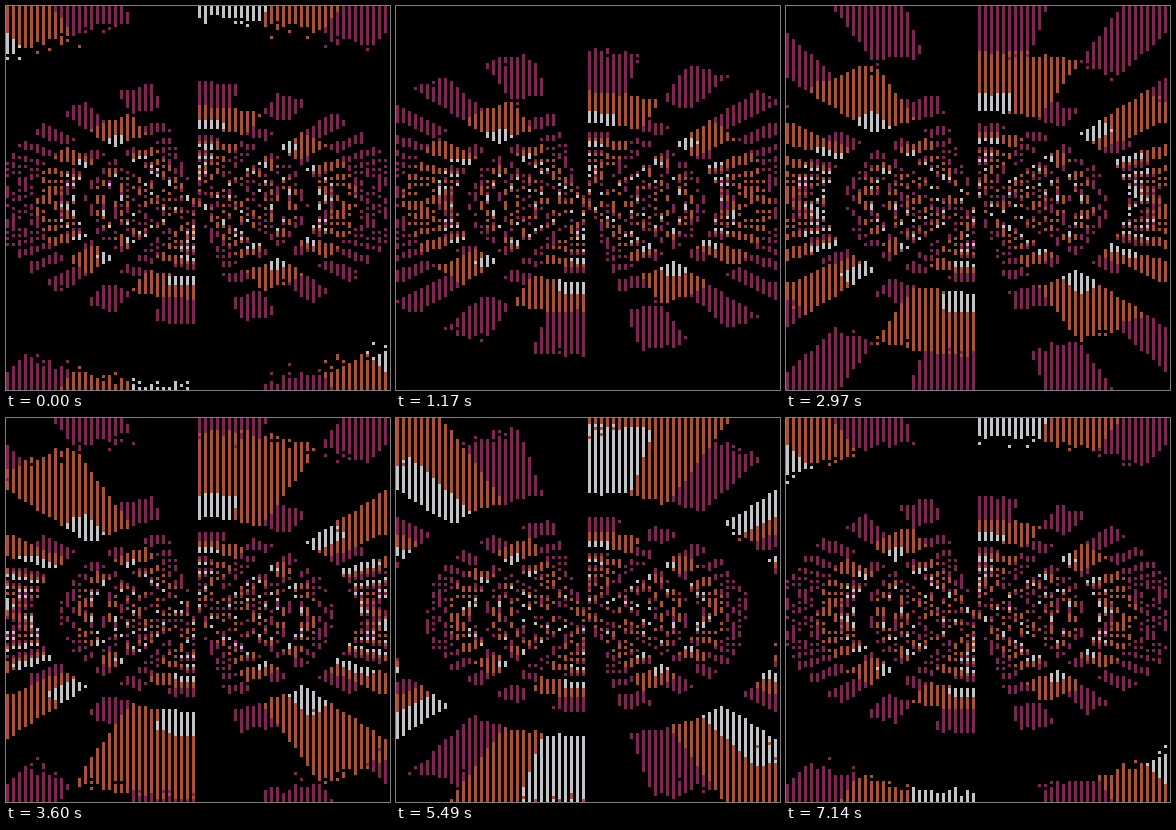
Recreate the animation shown at these times as an HTML page with a canvas. Size 384x384 px, loop 7.17 s.

```html
<!DOCTYPE html>
<html lang="en">
<head>
<meta charset="utf-8">
<title>Bitwise tunnel</title>
<style>
  html, body { margin: 0; width: 100%; height: 100%; overflow: hidden; background: #000; }
  canvas { display: block; width: 100vw; height: 100vh; image-rendering: pixelated; }
</style>
</head>
<body>
<canvas id="stage" width="384" height="384"></canvas>
<script>
const ctx = document.getElementById('stage').getContext('2d');
const LOOP = 7170, STEP = 30;
const SIZE = 128, CELL = 3, CX = 63, CY = 65;
const COLORS = ['#000', '#7e2553', '#ab5236', '#c2c3c7'];
const DEPTH = 2867, STRETCH = 5 / 3, START = -0.74, SPEED = 0.000553;
const REFRESH = 0.36, MAX_LAG = 16;

// Depth and bit mask of each cell never change; only the time offset does.
const cells = [];
for (let y = 0; y < SIZE; y++) {
  for (let x = 0; x < SIZE; x += 2) {
    const dx = x - CX, dy = y - CY;
    const slope = 2.8 * dx / (Math.abs(dy) + 0.04 * Math.abs(dx));
    cells.push({
      x, y,
      depth: DEPTH / ((dx / STRETCH) ** 2 + dy * dy) + START,
      mask: Math.floor(dy < 0 ? -slope : slope) & 3
    });
  }
}

function noise(x, y, n) {
  let h = Math.imul(x + 1, 374761393) ^ Math.imul(y + 1, 668265263) ^ Math.imul(n + 99, 1274126177);
  h = Math.imul(h ^ (h >>> 15), 2246822519);
  h = Math.imul(h ^ (h >>> 13), 3266489917);
  return ((h ^ (h >>> 16)) >>> 0) / 4294967296;
}

// Each tick repaints a random share of the cells, so some show an older moment.
function lastPaint(cell, tick) {
  let lag = 0;
  while (lag < MAX_LAG && noise(cell.x, cell.y, tick - lag) > REFRESH) lag++;
  return tick - lag;
}

function draw(tick) {
  ctx.fillStyle = COLORS[0];
  ctx.fillRect(0, 0, SIZE * CELL, SIZE * CELL);
  for (const cell of cells) {
    if (!cell.mask) continue;
    const time = lastPaint(cell, tick) * STEP;
    const color = Math.floor(cell.depth + time * SPEED) & cell.mask;
    if (!color) continue;
    ctx.fillStyle = COLORS[color];
    ctx.fillRect(cell.x * CELL, cell.y * CELL, CELL, CELL);
  }
}

const begin = performance.now();
let shown = -1;
function play() {
  const tick = Math.floor(((performance.now() - begin) % LOOP) / STEP);
  if (tick !== shown) draw(shown = tick);
  requestAnimationFrame(play);
}
play();
</script>
</body>
</html>
```
